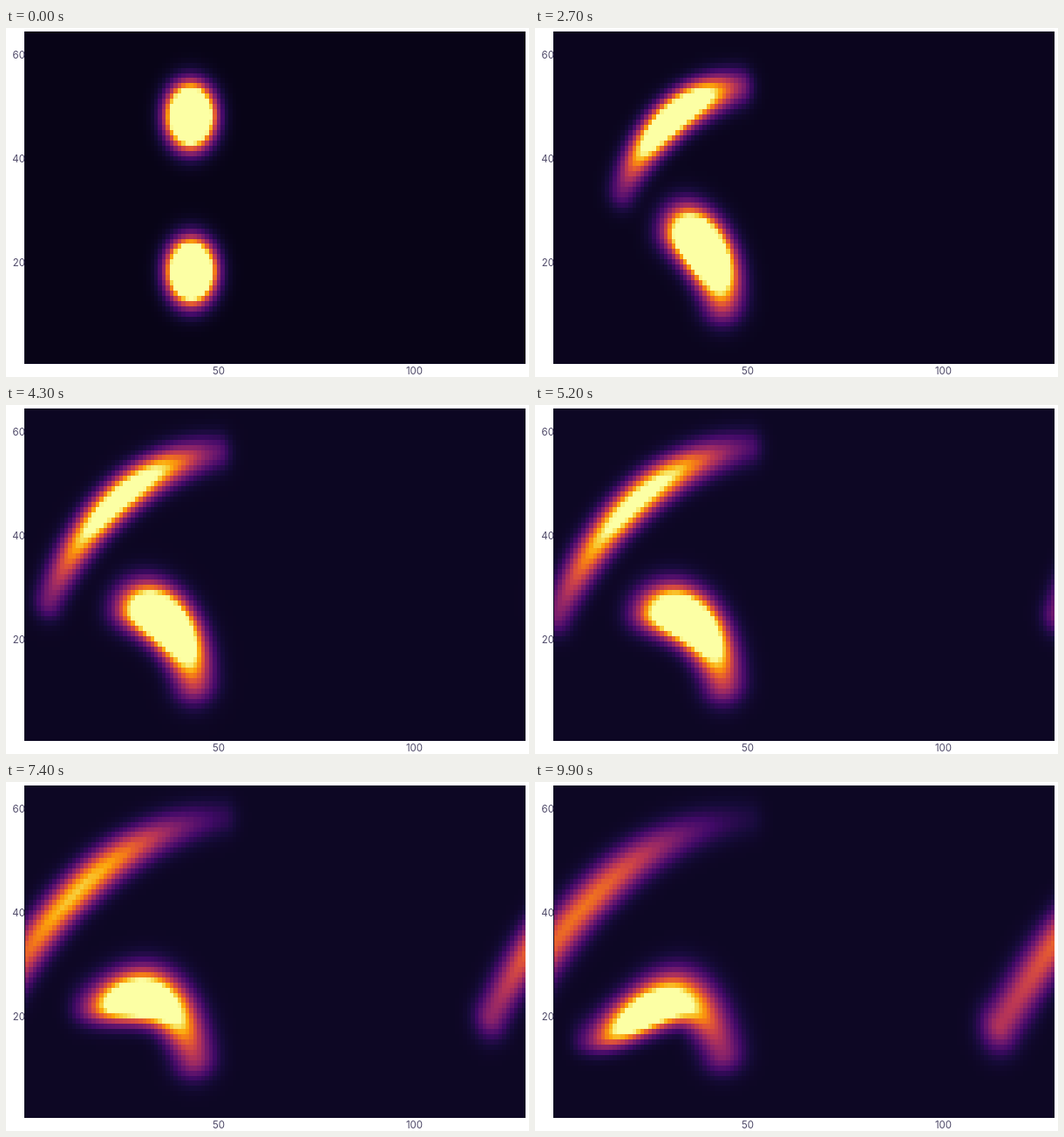
An HTML page with a canvas for the animation above (10000 ms loop, 600 by 400 pixels).

```html
<!DOCTYPE html>
<html lang="en">
<head>
<meta charset="utf-8">
<title>Two drifting plumes</title>
<style>
  html, body { margin: 0; width: 600px; height: 400px; overflow: hidden; background: #fff; }
  canvas, svg { position: absolute; left: 0; top: 0; display: block; }
  text { font: 11.5px Inter, sans-serif; fill: #4e4968; }
</style>
</head>
<body>
<canvas id="view" width="600" height="400"></canvas>
<svg width="600" height="400">
  <g text-anchor="end">
    <text x="22" y="35">60</text>
    <text x="22" y="154">40</text>
    <text x="22" y="273">20</text>
  </g>
  <g text-anchor="middle">
    <text x="244" y="397">50</text>
    <text x="468.5" y="397">100</text>
  </g>
</svg>
<script>
const COLS = 128, ROWS = 64, LOOP = 10000, STEP = 100, SAMPLES = 56;

const node = (mid, end, drop) => ({ mid, end, drop });
const lerp = (a, b, t) => a + (b - a) * t;

// A plume starts as a round spot; its four ridge nodes drift apart along curved
// paths. "drop" is how far a node's log strength lies below the peak.
const upper = {
  start: [42.8, 48.2],
  nodes: [
    node([2.5, 25.5], [-13.5, 18.3], [2.6, 0.3]),
    node([12.5, 38.8], [0, 33.5], [0.7, 0]),
    node([28.3, 50.3], [20, 49.2], [0.15, 0.15]),
    node([50, 56.8], [50, 58], [1.4, 2.3])
  ],
  pace: t => t,
  peak: t => 1.15 - 2.15 * t + 0.45 * t * t,
  width: (t, s) => 2.25 + 1.15 * Math.exp(-12 * t) + 0.25 * t + 0.8 * t * t * (1 - s),
  skew: t => 0
};
const lower = {
  start: [43, 18.2],
  nodes: [
    node([27, 26], [8.5, 14.8], [2, 2.1]),
    node([33.4, 25], [20.5, 18.7], [0.3, 0.1]),
    node([39.8, 20.6], [33, 22], [0.15, 0.25]),
    node([43.6, 12.8], [43.5, 13.2], [1.4, 1.5])
  ],
  pace: t => Math.pow(t, 0.7),
  peak: t => 1.15 - 0.75 * t,
  width: (t, s) => 3.4 + t * lerp(-1.1, 0.2, s),
  skew: t => 0.25 * t
};

const RAMP = ["000004", "160b39", "420a68", "6a176e", "932667", "bc3754",
  "dd513a", "f37819", "fca50a", "f6d746", "fcffa4"]
  .map(hex => [0, 2, 4].map(i => parseInt(hex.slice(i, i + 2), 16)));

const ctx = document.getElementById("view").getContext("2d");
const grid = document.createElement("canvas");
grid.width = COLS;
grid.height = ROWS;
const gridCtx = grid.getContext("2d");
const image = gridCtx.createImageData(COLS, ROWS);

// Parabola through a at 0, b at 0.5 and c at 1.
const through = (a, b, c, t) =>
  2 * (t - 0.5) * (t - 1) * a + 4 * t * (1 - t) * b + 2 * t * (t - 0.5) * c;

// Points along the cubic through the four nodes.
function ridge(plume, t) {
  const p = plume.pace(t), [x0, y0] = plume.start;
  const nodes = plume.nodes.map(n => ({
    x: through(x0, n.mid[0], n.end[0], p),
    y: through(y0, n.mid[1], n.end[1], p),
    power: plume.peak(t) - lerp(n.drop[0], n.drop[1], t)
  }));
  // The undivided spot has its full strength.
  if (t === 0) nodes.forEach(n => { n.power = plume.peak(0); });
  return Array.from({ length: SAMPLES + 1 }, (_, i) => {
    const s = i / SAMPLES, q = 3 * s;
    const weights = [
      -(q - 1) * (q - 2) * (q - 3) / 6,
      q * (q - 2) * (q - 3) / 2,
      -q * (q - 1) * (q - 3) / 2,
      q * (q - 1) * (q - 2) / 6
    ];
    const mix = key => weights.reduce((sum, w, k) => sum + w * nodes[k][key], 0);
    return { x: mix("x"), y: mix("y"), power: mix("power"), width: plume.width(t, s) };
  });
}

function density(points, x, y, skew) {
  let best = -20;
  for (const p of points) {
    let dx = x - p.x;
    if (dx > COLS / 2) dx -= COLS;
    const dy = (y - p.y) / (y > p.y ? 1 + skew : 1 - skew);
    const level = p.power - (dx * dx + dy * dy) / (2 * p.width * p.width);
    if (level > best) best = level;
  }
  return Math.exp(best);
}

function paint(value, at) {
  const v = Math.min(1, value) * (RAMP.length - 1);
  const i = Math.min(RAMP.length - 2, Math.floor(v));
  for (let c = 0; c < 3; c++) image.data[at + c] = lerp(RAMP[i][c], RAMP[i + 1][c], v - i);
  image.data[at + 3] = 255;
}

function draw(time) {
  const t = time / LOOP;
  const plumes = [upper, lower].map(p => ({ points: ridge(p, t), skew: p.skew(t) }));
  const base = 0.035 + 0.025 * Math.min(1, 2 * t);
  for (let row = 0; row < ROWS; row++) {
    for (let col = 0; col < COLS; col++) {
      const value = plumes.reduce(
        (sum, p) => sum + density(p.points, col + 1, ROWS - row, p.skew), base);
      paint(value, 4 * (row * COLS + col));
    }
  }
  gridCtx.putImageData(image, 0, 0);
  ctx.fillStyle = "#fff";
  ctx.fillRect(0, 0, 600, 400);
  ctx.fillStyle = "#0a0620";
  ctx.fillRect(21, 4, 575, 381);
  ctx.imageSmoothingEnabled = false;
  ctx.drawImage(grid, 22, 4, 574, 380);
}

let start = null, shown = -1;
function tick(now) {
  if (start === null) start = now;
  const step = Math.floor(((now - start) % LOOP) / STEP);
  if (step !== shown) {
    shown = step;
    draw(step * STEP);
  }
  requestAnimationFrame(tick);
}
draw(0);
requestAnimationFrame(tick);
</script>
</body>
</html>
```
